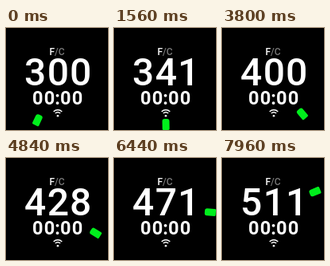
An HTML page that plays this animation: 128x128 px, repeating every 8000 ms.

```html
<!DOCTYPE html>
<html lang="en">
<head>
<meta charset="utf-8">
<title>Temperature dial</title>
<style>
  html, body { margin: 0; width: 100%; height: 100%; overflow: hidden; background: #000; }
  svg { display: block; width: 100%; height: 100%; }
  text { font-family: Roboto, "Open Sans", sans-serif; font-weight: 500; fill: #fff; }
  .digits { text-anchor: middle; }
  .wifi path { fill: none; stroke: #fff; stroke-width: 1.4; }
</style>
</head>
<body>
<svg viewBox="0 0 128 128">
  <text x="54.5" y="34" font-size="12">F<tspan fill="#777">/C</tspan></text>
  <text id="temp" class="digits" x="36.7 65.4 93.6" y="72.4" font-size="48">300</text>
  <text class="digits" x="39.8 54.6 64.6 74.8 89.6" y="95.6" font-size="23.6" style="font-weight:600">00:00</text>
  <g class="wifi" transform="translate(65 110.3)">
    <path d="M-5.3-5.3A7.5 7.5 0 0 1 5.3-5.3M-3.2-3.2A4.5 4.5 0 0 1 3.2-3.2"/>
    <circle r="1.3" fill="#fff"/>
  </g>
  <!-- Marker at the bottom of the dial, turned around the centre -->
  <path id="mark" fill="#00ee1c"
    d="M59.5 117a3 3 0 0 1 3-3h3a3 3 0 0 1 3 3v9.5a1.5 1.5 0 0 1-1.5 1.5h-6a1.5 1.5 0 0 1-1.5-1.5z"/>
</svg>
<script>
  const LOOP = 8000, STEP = 40;
  const START_TEMP = 300, TEMP_PER_STEP = 16 / 15;
  const START_ANGLE = -25.3, ANGLE_PER_STEP = 0.695;
  const temp = document.getElementById('temp');
  const mark = document.getElementById('mark');

  function draw(ms) {
    // The first pose is held for two steps
    const step = Math.max(0, Math.floor((ms % LOOP) / STEP) - 1);
    const angle = START_ANGLE + step * ANGLE_PER_STEP;
    temp.textContent = START_TEMP + Math.round(step * TEMP_PER_STEP);
    mark.setAttribute('transform', `rotate(${-angle} 64 64)`);
  }

  const began = performance.now();
  function tick() {
    draw(performance.now() - began);
    requestAnimationFrame(tick);
  }
  tick();
</script>
</body>
</html>
```
